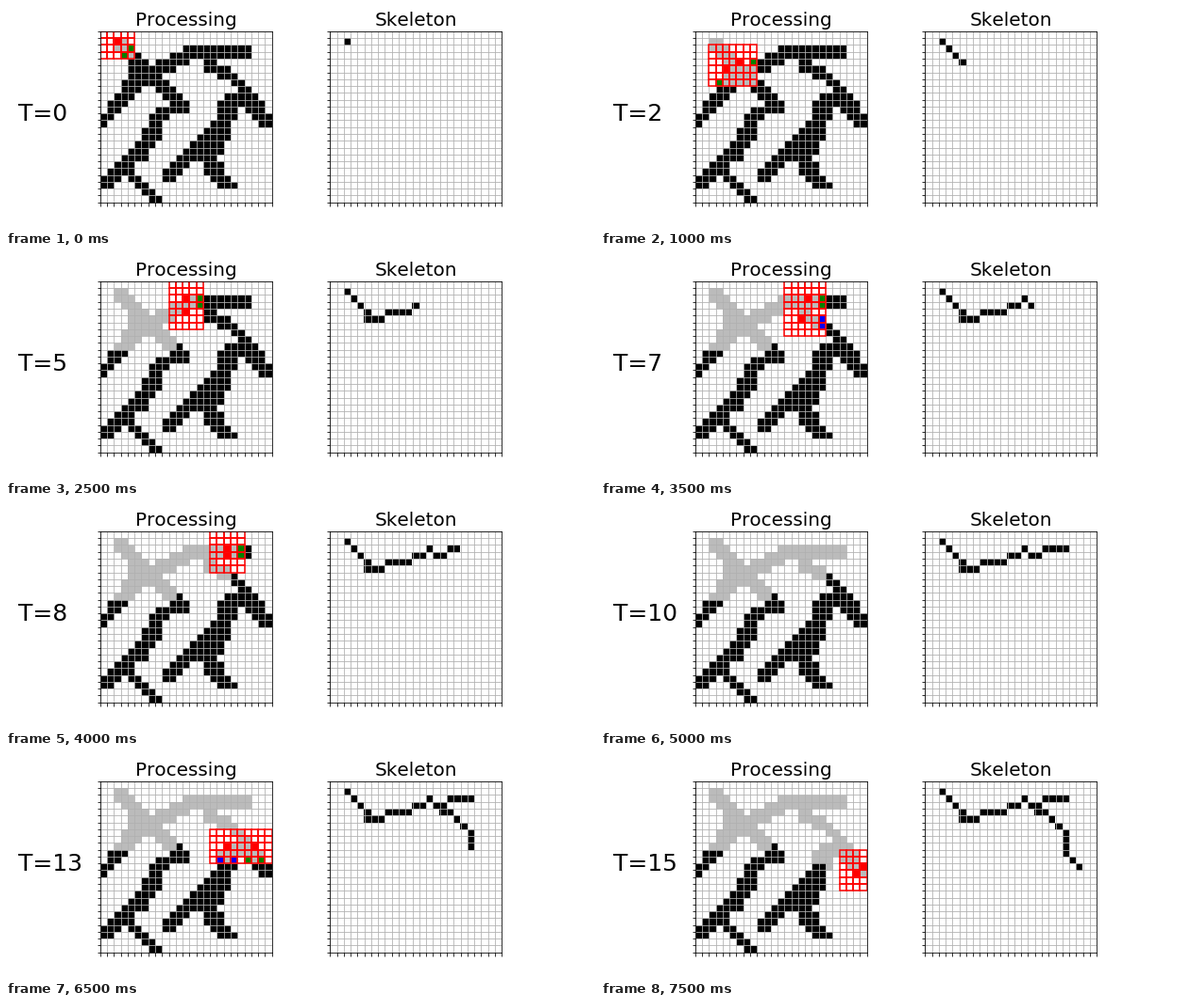
A matplotlib script for the animation above (8000 ms loop, 624x236 px).

```python
from math import ceil, floor

import numpy as np
import matplotlib.pyplot as plt
from matplotlib.animation import FuncAnimation
from matplotlib.colors import to_rgb
from matplotlib.patches import Rectangle

W, H, DPI = 624, 236, 72
N, SIDE, TOP = 25, 181.9, 26.85
STEPS, REACH, START = 16, 2, (1, 2)

# Brush strokes: key points (row, left edge, right edge), straight between
STROKES = [
    [(1, 2, 3), (10, 10.1, 12)],
    [(2, 12, 21), (3, 10, 21), (4, 8, 12), (5, 4.6, 10), (8, 3, 5), (13, 0, 0)],
    [(4, 15, 16), (5, 15, 18), (7, 19, 20), (8, 20, 21.5), (13, 23, 25.3)],
    [(9, 18, 20.9), (12, 17, 19), (14, 15, 18.9), (18, 11, 16.5),
     (19, 10, 12), (21, 9, 10)],
    [(19, 15, 17), (20, 15, 17), (22, 17, 19)],
    [(11, 8, 12), (12, 7.6, 9), (15, 6, 8), (18, 3, 6), (19, 2, 4), (22, -1, 1)],
    [(20, 3, 4), (24, 7, 8)],
]


def draw_shape():
    cells = np.zeros((N, N), bool)
    for keys in STROKES:
        rows, left, right = zip(*keys)
        for r in range(rows[0], rows[-1] + 1):
            a = floor(np.interp(r, rows, left) + 1e-9)
            b = floor(np.interp(r, rows, right) + 1e-9)
            cells[r, max(a, 0):b + 1] = True
    return cells


def window(pair):
    """Bounds of the pair, widened by REACH and clipped to the grid."""
    rows, cols = zip(*pair)
    return (max(min(rows) - REACH, 0), min(max(rows) + REACH, N - 1),
            max(min(cols) - REACH, 0), min(max(cols) + REACH, N - 1))


def border(r0, r1, c0, c1):
    """Cells along the window's edge, clockwise from the top left."""
    return ([(r0, c) for c in range(c0, c1)] +
            [(r, c1) for r in range(r0, r1)] +
            [(r1, c) for c in range(c1, c0, -1)] +
            [(r, c0) for r in range(r1, r0, -1)])


def exits(box, seen):
    """End cells of the first run leaving the window, and of what follows it."""
    ring = border(*box)
    hits = [i for i, cell in enumerate(ring) if shape[cell] and not seen[cell]]
    cut = next((k for k in range(1, len(hits)) if hits[k] > hits[k - 1] + 1),
               len(hits))
    return [[ring[part[0]], ring[part[-1]]] if part else None
            for part in (hits[:cut], hits[cut:])]


def line(p, q):
    n = max(abs(q[0] - p[0]), abs(q[1] - p[1]), 1)

    def along(a, b, i):
        return a + (1 if b > a else -1) * ceil(abs(b - a) * i / n - 0.5)

    return [(along(p[0], q[0], i), along(p[1], q[1], i)) for i in range(n + 1)]


def paint(img, cells, color):
    for cell in cells or []:
        img[cell] = to_rgb(color)


def trace():
    """Follow the shape window by window; return both images and the window."""
    seen = np.zeros((N, N), bool)
    skeleton = np.ones((N, N, 3))
    waiting, pair, last, out = [], [START], START, []
    for _ in range(STEPS):
        img = np.ones((N, N, 3))
        img[shape] = 0
        box = None
        if pair:
            box = r0, r1, c0, c1 = window(pair)
            seen[r0:r1 + 1, c0:c1 + 1] |= False
            ahead, branch = exits(box, seen)
            seen[r0:r1 + 1, c0:c1 + 1] = True
            center = (r0 + r1) // 2, (c0 + c1) // 2
            paint(skeleton, line(last, center), "black")
            if branch:
                waiting.append((branch, center))
        img[shape & seen] = to_rgb("#bbbbbb")
        if pair:
            paint(img, ahead, "green")
            paint(img, branch, "blue")
            paint(img, pair, "red")
            pair, last = ahead, center
        elif waiting:
            pair, last = waiting.pop()
        out.append((img, skeleton.copy(), box))
    return out


def make_panel(left, title):
    ax = fig.add_axes([left / W, 1 - (TOP + SIDE) / H, SIDE / W, SIDE / H])
    ax.set_title(title, fontsize=20, pad=6)
    im = ax.imshow(np.ones((N, N, 3)), interpolation="nearest", aspect="auto")
    edges = np.arange(N + 1) - 0.5
    ax.set_xticks(edges)
    ax.set_yticks(edges)
    ax.tick_params(labelbottom=False, labelleft=False)
    ax.grid(color="#b0b0b0", lw=0.8)
    return ax, im


shape = draw_shape()
history = trace()

plt.rcParams.update({"font.family": "DejaVu Sans", "text.kerning_factor": 6})
fig = plt.figure(figsize=(W / DPI, H / DPI), dpi=DPI, facecolor="white")
left_ax, left_im = make_panel(99.77, "Processing")
right_ax, right_im = make_panel(343.27, "Skeleton")
label = fig.text(12.5 / W, 1 - 121.6 / H, "", fontsize=25)
outlines = []


def update(step):
    img, skeleton, box = history[step]
    left_im.set_data(img)
    right_im.set_data(skeleton)
    while outlines:
        outlines.pop().remove()
    if box:
        r0, r1, c0, c1 = box
        for r in range(r0, r1 + 1):
            for c in range(c0, c1 + 1):
                cell = Rectangle((c - 0.5, r - 0.5), 1, 1, fill=False,
                                 ec="red", lw=1.5, zorder=2)
                outlines.append(left_ax.add_patch(cell))
    label.set_text(f"T={step}")
    return [left_im, right_im, label, *outlines]


anim = FuncAnimation(fig, update, frames=STEPS, interval=500,
                     init_func=lambda: update(0), repeat=True, repeat_delay=0)
plt.show()
```
